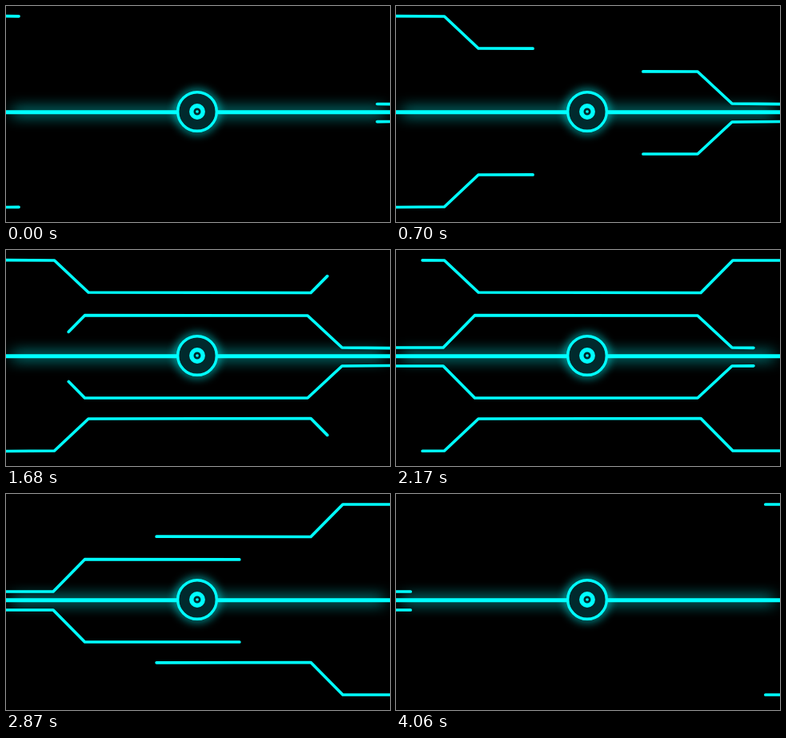
An HTML page without scripts that plays this animation: 480x270 px, repeating every 4200 ms.

```html
<!DOCTYPE html>
<html lang="en">
<head>
<meta charset="utf-8">
<title>Circuit lines</title>
<style>
  html, body { margin: 0; width: 100%; height: 100%; overflow: hidden; background: #000; }
  svg { display: block; width: 100vw; height: 100vh; }
  .core { fill: none; stroke: #0ff; }
  .glow { fill: none; stroke: #0ff; stroke-width: 5; }
  .wide { filter: blur(9px); }
  .near { filter: blur(6px); }
  .trace {
    fill: none;
    stroke: #0ff;
    stroke-width: 3.7;
    stroke-linecap: round;
    stroke-linejoin: round;
    stroke-dasharray: 513 1026;
    animation: run 4200ms steps(58, end) infinite;
  }
  /* One dash as long as the path slides in, fills it and slides out. */
  @keyframes run {
    0% { stroke-dashoffset: 497; }
    96.6667%, 100% { stroke-dashoffset: -494.8; }
  }
</style>
</head>
<body>
<svg viewBox="0 0 480 270" preserveAspectRatio="none">
  <rect width="480" height="270" fill="#000"/>

  <g class="wide">
    <rect x="8" y="129.5" width="464" height="6" fill="#0ff"/>
  </g>
  <g class="near">
    <circle class="glow" cx="239" cy="132" r="24.3"/>
  </g>
  <circle cx="239" cy="132" r="24" fill="#002a2d"/>

  <path class="core" stroke-width="5" d="M0 132.7H215M263 132.7H480"/>
  <circle class="core" stroke-width="3.4" cx="239" cy="132" r="24.3"/>
  <circle class="core" stroke-width="5.4" cx="239" cy="132" r="7.2"/>
  <circle cx="239" cy="132" r="1.8" fill="#0ff"/>

  <g>
    <path class="trace" pathLength="513" d="M0 12.7L60.5 13L103 53L381 53.5L421 13H480"/>
    <path class="trace" pathLength="513" d="M0 251.5L60.5 251L103 211L381 210.5L421 251H480"/>
    <path class="trace" pathLength="513" d="M480 122.7L420 122L377 82L98.5 81.7L59 122H0"/>
    <path class="trace" pathLength="513" d="M480 144.5L420 145L377 185H98.5L59 145H0"/>
  </g>
</svg>
</body>
</html>
```
